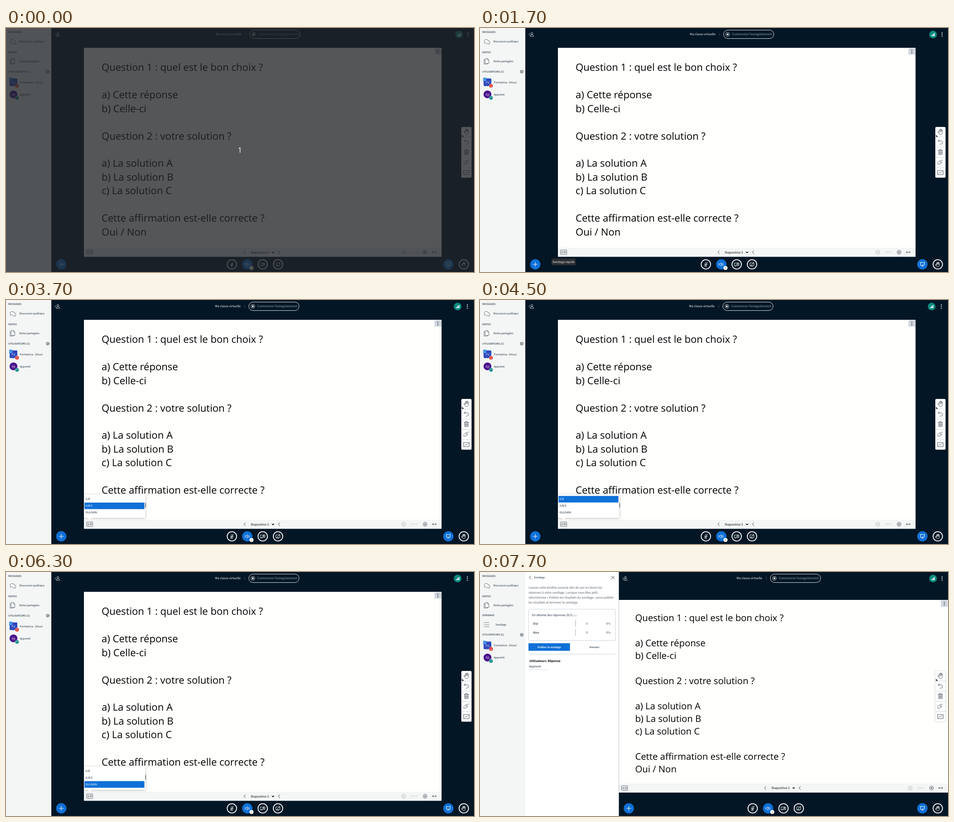
Write an HTML page with a canvas that moves like this. It is 1033 px wide and 542 px high and loops after 8 s.

```html
<!DOCTYPE html>
<html lang="fr">
<head>
<meta charset="utf-8">
<title>Sondage rapide</title>
<style>
html, body { margin: 0; width: 100%; height: 100%; overflow: hidden; background: #031625; }
canvas { display: block; width: 1033px; height: 542px; }
</style>
</head>
<body>
<canvas id="stage" width="1033" height="542"></canvas>
<script>
const ctx = document.getElementById('stage').getContext('2d');
const LOOP = 8000, STEP = 100;
const DARK = '#031625', PALE = '#f3f6f5', PAPER = '#fffffd', BLUE = '#0f70d7',
      GREY = '#4e5a66', INK = '#1b2a3a', TEAL = '#07897f', WHITE = '#fff';
const UI = '"Noto Sans CJK JP", "Noto Sans CJK SC", "Noto Sans CJK", "Noto Sans", sans-serif';
const UI_SCALE = 0.896;
const SLIDE = '"Open Sans", "Noto Sans", sans-serif';
const SMALL = 6.6, BASE = 7.45;

// y is the middle of the capitals
function text(str, x, y, size = BASE, color = INK, style = '', align = 'left') {
  ctx.font = `${style} ${size * UI_SCALE}px ${UI}`;
  ctx.fillStyle = color;
  ctx.textAlign = align;
  ctx.fillText(str, x, y + size * 0.33);
}

function rect(x, y, w, h, color, r = 0) {
  ctx.fillStyle = color;
  ctx.beginPath();
  ctx.roundRect(x, y, w, h, r);
  ctx.fill();
}

function frame(x, y, w, h, color, width = 1, r = 0) {
  ctx.strokeStyle = color;
  ctx.lineWidth = width;
  ctx.beginPath();
  ctx.roundRect(x, y, w, h, r);
  ctx.stroke();
}

function disc(x, y, r, color) {
  ctx.fillStyle = color;
  ctx.beginPath();
  ctx.arc(x, y, r, 0, Math.PI * 2);
  ctx.fill();
}

function ring(x, y, r, color, width = 1) {
  ctx.strokeStyle = color;
  ctx.lineWidth = width;
  ctx.beginPath();
  ctx.arc(x, y, r, 0, Math.PI * 2);
  ctx.stroke();
}

// SVG path around a centre, stroked or filled
function icon(d, x, y, color, width = 1, scale = 1) {
  ctx.save();
  ctx.translate(x, y);
  ctx.scale(scale, scale);
  ctx.lineWidth = width / scale;
  ctx.strokeStyle = ctx.fillStyle = color;
  ctx.lineCap = ctx.lineJoin = 'round';
  const path = new Path2D(d);
  if (width) ctx.stroke(path); else ctx.fill(path);
  ctx.restore();
}

function line(x1, y1, x2, y2, color, width = 1) {
  icon(`M0 0L${x2 - x1} ${y2 - y1}`, x1, y1, color, width);
}

function kebab(x, y, gap, r, color) {
  for (let i = -1; i <= 1; i++) disc(x, y + i * gap, r, color);
}

const HAND = 'M-3 1.5V-2.8a.8.8 0 0 1 1.6 0V-4.2a.8.8 0 0 1 1.6 0V-4.6a.8.8 0 0 1 1.6 0V-3.4' +
  'a.8.8 0 0 1 1.6 0V2.2c0 2-1.2 3.4-3.2 3.4h-.8c-1.4 0-2.2-.6-3-1.8L-5.4.8c-.4-1 .8-1.5 1.5-.6z' +
  'M-1.4-2.8V0M.2-4V0M1.8-3.4V0';
const CHEVRON = 'M1.5-3.5L-2 0L1.5 3.5';
const SCREEN = 'M-4-3h8v5.5h-8zM-1.5 4h3';
const PERSON = 'M-2-2a2 2.2 0 1 0 4 0a2 2.2 0 1 0-4 0M-3.7 4V3c0-1.2 1-1.6 2.2-1.8h3c1.2.2 2.2.6 2.2 1.8v1z';
const BUBBLES = 'M3.5-.8c0-2.2-2-3.7-4.7-3.7S-6-3-6-.8c0 1.2.5 2 1.3 2.6L-5.2 4l2.3-1.2' +
  'M3.5-1.4C5.5-1.2 6.7.2 6.7 2c0 1-.5 1.8-1.2 2.4L6 6 4 5.1C1.5 5.7-1 5-1.6 3.2';
const PAGES = 'M-2.5-6H2.5L5.5-3V4.5H-2.5zM2.5-6V-3H5.5M-2.5-3.5H-5V6.2H2.7V4.5';

function user(y, initials, name, me) {
  if (me) {
    rect(8, y - 8.5, 17, 17, '#2f49bd', 2);
    rect(6.8, y - 10, 7.6, 7.6, BLUE, 1.5);
    icon(SCREEN, 10.6, y - 6.2, WHITE, 0.6, 0.6);
  } else disc(16.5, y, 8.7, '#4a148c');
  text(initials, 16.5, y, BASE, '#e8ecf6', '', 'center');
  disc(24.3, y + 7.8, 4.5, PALE);
  disc(24.3, y + 7.8, 3.9, me ? '#df2721' : '#008081');
  icon(me ? 'M0-2V.2M-1.4 0a1.4 1.4 0 0 0 2.8 0M0 1.5V2.2' : 'M-1.6 1.4V0a1.6 1.6 0 0 1 3.2 0V1.4',
    24.3, y + 7.8, WHITE, 0.7);
  text(name, 30.5, y, SMALL);
  if (me) text('(Vous)', 63.3, y, SMALL, INK, 'italic');
}

function sidebar(poll) {
  const heading = (s, y) => text(s, 5, y, 6.2, GREY, 'bold');
  const dy = poll ? 42.6 : 0;
  rect(0, 0, 100, 542, PALE);
  heading('MESSAGES', 9);
  icon(BUBBLES, 15, 30, GREY, 0.8);
  text('Discussion publique', 29.5, 30, SMALL);
  heading('NOTES', 53.5);
  icon(PAGES, 14, 74, GREY, 0.8);
  text('Notes partagées', 29.5, 74, SMALL);
  if (poll) {
    heading('SONDAGE', 96);
    for (let i = -1; i <= 1; i++) {
      disc(9, 117 + i * 4.6, 0.8, GREY);
      line(11.5, 117 + i * 4.6, 20, 117 + i * 4.6, GREY, 0.8);
    }
    text('Sondage', 34, 117, SMALL);
  }
  heading('UTILISATEURS (2)', 96.7 + dy);
  ring(92, 97 + dy, 2.8, GREY, 1);
  ring(92, 97 + dy, 1, GREY, 0.8);
  ctx.setLineDash([1.2, 1.4]);
  ring(92, 97 + dy, 3.6, GREY, 1);
  ctx.setLineDash([]);
  user(120.5 + dy, 'Fo', 'Formatrice', true);
  user(147.4 + dy, 'Ap', 'Apprenti', false);
}

// left: edge of the main area, shift: small header offset while the menu is open
function header(left, shift) {
  const mid = (left - 100) / 2 - shift;
  icon('M1-2L-1 0L1 2', left + 9, 14, '#d5dde2', 0.8);
  icon(PERSON, left + 14.5, 14, '#d5dde2', 0.9);
  text('Ma classe virtuelle', 463 + mid, 13.8, BASE, WHITE);
  line(529 + mid, 11, 529 + mid, 17, '#4c5a66', 0.8);
  frame(537.6 + mid, 4.6, 111, 18.8, '#dfe5e9', 1, 9.4);
  ring(546.6 + mid, 14, 4.1, WHITE, 0.8);
  disc(546.6 + mid, 14, 2, WHITE);
  text('Commencer l\u2019enregistrement', 556.5 + mid, 13.8, 7.25, '#a4b0b9');
  disc(1000 - shift * 1.8, 14.5, 8.5, TEAL);
  for (let i = 0; i < 4; i++)
    rect(996 + i * 2.1 - shift * 1.8, 16.4 - i * 1.8, 1.5, 1.8 + i * 1.8, WHITE);
  kebab(1020 - shift, 14.7, 3.8, 1.1, WHITE);
}

const LINES = [
  [0, 'Question 1 : quel est le bon choix ?'],
  [2, 'a) Cette réponse'],
  [3, 'b) Celle-ci'],
  [5, 'Question 2 : votre solution ?'],
  [7, 'a) La solution A'],
  [8, 'b) La solution B'],
  [9, 'c) La solution C'],
  [11, 'Cette affirmation est-elle correcte ?'],
  [12, 'Oui / Non']
];

function slide(x, y, scale) {
  ctx.save();
  ctx.translate(x, y);
  ctx.scale(scale, scale);
  rect(0, 0, 789.4, 445, PAPER);
  ctx.font = `22.07px ${SLIDE}`;
  ctx.fillStyle = '#000';
  ctx.textAlign = 'left';
  for (const [row, str] of LINES) ctx.fillText(str, 39, 51.3 + row * 30.45);
  ctx.restore();
}

function toolbar(left, right, y) {
  const mid = (left + right) / 2 - 566.5, c = y + 9.8;
  rect(left, y, right - left, 20, PALE);
  frame(left + 5.8, c - 5, 13.6, 9.8, GREY, 0.9, 1);
  text('A/B', left + 12.6, c, 6.8, INK, '', 'center');
  icon(CHEVRON, 526.7 + mid, c, INK, 0.9);
  text('Diapositive 3', 540 + mid, c, BASE, '#000');
  icon('M-2-.9L0 1.1L2-.9', 589.2 + mid, c + 0.2, '#000', 1.4);
  icon(CHEVRON, 602.8 + mid, c, INK, 0.9, 1);
  const zoom = right - 961.4;
  ring(878 + zoom, c, 4.1, '#9aa3aa', 0.8);
  line(876 + zoom, c, 880 + zoom, c, '#9aa3aa', 0.8);
  text('100 %', 901.3 + zoom, c, SMALL, '#c3c8cb', '', 'center');
  ring(925 + zoom, c, 4.1, INK, 0.8);
  icon('M-2 0H2M0-2V2', 925 + zoom, c, INK, 0.8);
  icon('M-4.3 0H4.3M-2.6-1.8L-4.4 0L-2.6 1.8M2.6-1.8L4.4 0L2.6 1.8', 945.3 + zoom, c, INK, 0.8);
}

function actions(left) {
  const y = 525, mid = (left - 100) / 2;
  const solid = x => disc(x, y, 11.4, BLUE);
  const hollow = x => ring(x, y, 10.4, WHITE, 1.8);
  solid(left + 22);
  icon('M-4.8 0H4.8M0-4.8V4.8', left + 22, y, WHITE, 1);
  hollow(498.6 + mid);
  icon('M-1.5-3a1.5 1.5 0 0 1 3 0V0a1.5 1.5 0 0 1-3 0zM-3-.5a3 3 0 0 0 6 0M0 2.5V4.8M-1.8 4.8H1.8M3.8-5L-3.8 4.6',
    498.6 + mid, y, WHITE, 0.8);
  solid(532.6 + mid);
  icon('M-4.8-1.5h2L0-4V4L-2.8 1.5h-2zM1.8-1.6q1.2 1.6 0 3.2M3.6-2.8q2 2.8 0 5.6', 532.6 + mid, y, WHITE, 0.8);
  disc(541.9 + mid, 533, 4.6, WHITE);
  icon('M-1.4-.5L0 .7L1.4-.5', 541.9 + mid, 533, INK, 0.7);
  hollow(566.6 + mid);
  icon('M-5-3h7v6h-7zM2-.8L5-2.6V2.6L2 .8M3.5-4.4L-3.5 4.4', 566.6 + mid, y, WHITE, 0.9);
  hollow(600.4 + mid);
  icon('M-4.2-3.2h8.4v5.8h-8.4zM-1.6 4.3h3.2M4.2-4.6L-4 4.4', 600.4 + mid, y, WHITE, 0.9);
  solid(976.4);
  icon('M-5-4H5M-4.2-4V2H4.2V-4M0 2V3.4M-2 4.8L0 3L2 4.8', 976.4, y, WHITE, 1);
  hollow(1010.5);
  icon(HAND, 1010.5, y, WHITE, 0.9, 0.95);
}

function tools() {
  const x = 1016.3;
  ctx.save();
  ctx.shadowColor = 'rgba(0,0,0,.3)';
  ctx.shadowBlur = 3;
  rect(1005, 219.8, 22.6, 112.8, WHITE, 2.5);
  ctx.restore();
  for (let i = 1; i < 5; i++) line(1005, 219.6 + i * 22.65, 1027.6, 219.6 + i * 22.65, '#c4cbd2', 0.9);
  icon(HAND, x + 0.5, 230.3, GREY, 0.9, 1.1);
  icon('M0 0V4.6H4.6z', 1006.3, 237.1, INK, 0);
  icon('M-2.5-5L-5.3-2.4L-2.5.2M-5-2.4H1.2a3.7 3.7 0 0 1 0 7.4H-1', x, 253, GREY, 1);
  icon('M-5-4H5M-1.8-4V-5.6H1.8V-4M-4-4V5.6H4V-4M-1.9-2V3.8M0-2V3.8M1.9-2V3.8', x, 275.6, GREY, 1);
  icon('M-5.5 5V1.2c0-1.2.8-2 2-2.7L-.5-4c1-.8 2 .3 1.2 1.2L-1-.8H2.2c1.2 0 1.2 1.6 0 1.6H1.4' +
    'c1 .2.8 1.5-.2 1.5H.5c.6.5.3 1.4-.6 1.4H-2.5L-4 5M1.5-4.2C3-6 3.5-3 5.5-5', x, 298.2, GREY, 0.9);
  icon('M-6-4.6H6V4.6H-6zM-4 2.2L-1.4-.8L.6.8L4-2.4', x, 321.2, GREY, 1);
}

function tooltip(alpha) {
  ctx.globalAlpha = alpha;
  rect(157.5, 512, 53.5, 15, '#2b2d30', 2);
  text('Sondage rapide', 184.2, 519.4, 7.5, '#eef0f1', '', 'center');
  ctx.globalAlpha = 1;
}

function menu(active) {
  ctx.save();
  ctx.shadowColor = 'rgba(0,0,0,.3)';
  ctx.shadowBlur = 5;
  ctx.shadowOffsetY = 1;
  rect(172, 432, 135.6, 52, WHITE, 1);
  ctx.restore();
  icon('M-5 0H5L0 4.2z', 184.5, 484, WHITE, 0);
  ['A/B', 'A/B/C', 'OUI/NON'].forEach((label, i) => {
    const on = i === active;
    if (on) rect(173.3, 435.2 + i * 14.7, 132.2, 14.6, BLUE);
    text(label, 175.5, 442.2 + i * 14.7, SMALL, on ? WHITE : INK);
  });
}

const INTRO = [
  'Laissez cette fenêtre ouverte afin de voir en direct les',
  'réponses à votre sondage. Lorsque vous êtes prêt,',
  'sélectionnez « Publier les résultats du sondage » pour publier',
  'les résultats et terminer le sondage.'
];

function pollPanel(dots) {
  rect(100, 0, 206.5, 542, WHITE);
  icon(CHEVRON, 110.8, 12.2, INK, 0.9);
  text('Sondage', 119, 12, 6.3, GREY, 'bold');
  icon('M-3.4-3.4L3.4 3.4M3.4-3.4L-3.4 3.4', 293.2, 12.3, INK, 0.9);
  INTRO.forEach((s, i) => text(s, 107, 34.5 + i * 10.9, BASE, GREY));
  frame(107.5, 82.5, 191, 70, '#cdd3d8', 1, 1);
  text('En attente des réponses (0/1)', 115, 95.5);
  for (let i = 0; i < dots; i++) disc(207.7 + i * 2.7, 97.4, 0.65, INK);
  ['Oui', 'Non'].forEach((s, i) => {
    const y = 114.3 + i * 20;
    text(s, 117, y, BASE, GREY, 'bold');
    rect(210.2, y - 7.5, 1.4, 15, '#b7bfc6');
    text('0', 235.8, y, BASE, GREY, '', 'center');
    text('0%', 288.3, y, BASE, GREY, '', 'right');
  });
  rect(107, 158.2, 91.6, 16.8, BLUE, 1);
  text('Publier le sondage', 152.8, 166.5, 6.35, WHITE, 'bold', 'center');
  text('Annuler', 252.6, 166.5, 6.35, GREY, 'bold', 'center');
  line(107.5, 182.5, 298.5, 182.5, '#cdd3d8');
  text('Utilisateurs', 109, 197.2, BASE, '#000', 'bold');
  text('Réponse', 149.5, 197.2, BASE, '#000', 'bold');
  text('Apprenti', 108, 209.6, BASE);
  line(107.5, 217, 148, 217, '#d5dade', 0.9);
}

// last value whose start time has passed
const at = (keys, t) => keys.reduce((v, [start, value]) => t >= start ? value : v, null);

const POINTER = [[100, [219, 173.3]], [300, [235, 155]], [400, [252, 136]],
  [600, [228, 210]], [700, [205, 282]], [1400, null]];
const TIP = [[1400, 0.35], [1500, 0.8], [1600, 1], [1800, 0.6], [1900, 0.2], [2000, 0]];
const CHOICE = [[1900, -1], [2600, 2], [3700, 1], [4500, 0], [5600, 1], [6300, 2]];

function draw(now) {
  const t = Math.floor(now % LOOP / STEP) * STEP;
  const poll = t >= 7100, open = t >= 1900 && !poll;
  const left = poll ? 306.5 : 100;
  const [x, y, right, bar] = poll ? [306.5, 62, 1033, 470] : [172, 44, 961.4, 488.3];

  rect(0, 0, 1033, 542, DARK);
  sidebar(poll);
  if (poll) pollPanel(Math.min(3, Math.max(0, Math.floor((t - 7100) / 200))));
  header(left, open ? 1.7 : 0);
  slide(x, y, (right - x) / 789.4);
  rect(right - 15.6, y + 1, 15, 14, '#d0d6de', 1);
  kebab(right - 8.2, y + 8.2, 3.3, 0.9, INK);
  toolbar(x, right, bar);
  actions(left);
  tools();

  const dot = at(POINTER, t), tip = at(TIP, t);
  if (dot) disc(...dot, 2.8, '#ef4b4b');
  if (tip) tooltip(tip);
  if (open) menu(at(CHOICE, t));
  if (t < 100) {
    rect(0, 0, 1033, 542, 'rgba(33,36,40,.77)');
    ctx.font = `16.5px ${SLIDE}`;
    ctx.fillStyle = WHITE;
    ctx.textAlign = 'center';
    ctx.fillText('1', 516.3, 277);
  }
}

ctx.textRendering = 'geometricPrecision';
const start = performance.now();
function tick() {
  draw(performance.now() - start);
  requestAnimationFrame(tick);
}
tick();
</script>
</body>
</html>
```
